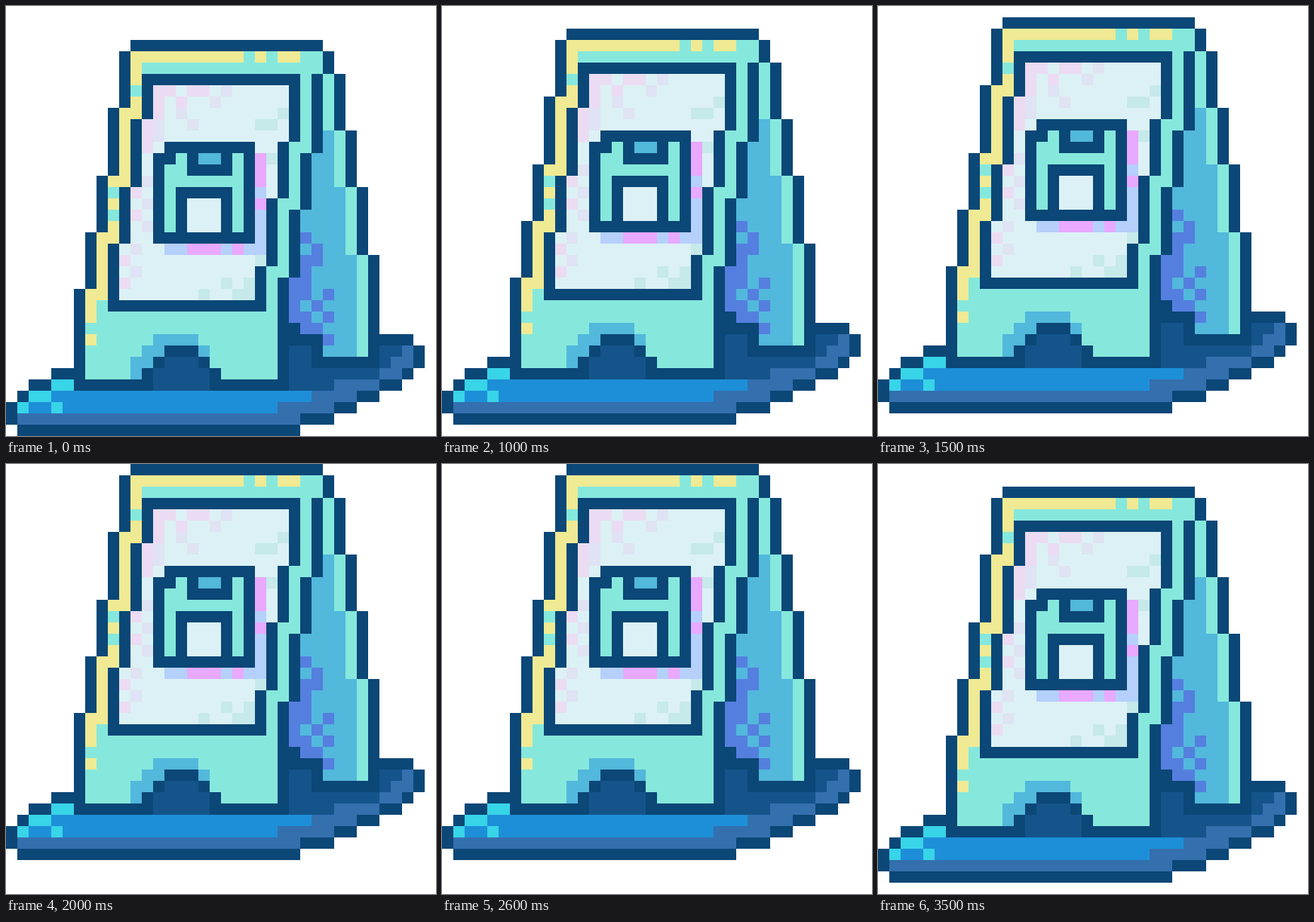
Recreate the animation shown at these times as an HTML page. Size 570x570 px, loop 4 s.

```html
<!DOCTYPE html>
<html lang="en">
<head>
<meta charset="utf-8">
<title>Floating pixel stand</title>
<style>
  html, body { margin: 0; width: 100%; height: 100%; overflow: hidden; background: #fff; }
  svg { display: block; width: 570px; height: 570px; overflow: visible; }
  .runs { fill: none; stroke-width: 1; }
</style>
</head>
<body>
<svg id="stand" viewBox="0 0 38 38" shape-rendering="crispEdges"></svg>
<script>
const CELL = 15;
const color = {
  ink: '#0b4777', mint: '#86e8dc', yellow: '#efea93', sky: '#52b8dc', violet: '#557fdf',
  screen: '#dcf1f5', rose: '#ebdcf3', haze: '#dfe3f3', teal: '#c6e9ea',
  pink: '#e8a9ff', lilac: '#b5d0fb',
  navy: '#14548a', steel: '#346fae', azure: '#1d8fd8', cyan: '#38d4e8'
};
const stand = document.getElementById('stand');

function draw(name, d, attributes) {
  const path = document.createElementNS('http://www.w3.org/2000/svg', 'path');
  path.setAttribute('d', d);
  for (const [key, value] of Object.entries(attributes)) path.setAttribute(key, value);
  stand.append(path);
}
const shape = (name, d) => draw(name, d, { fill: color[name] });
// Horizontal one-cell strokes, placed by the top-left cell of each run.
const runs = (name, d) =>
  draw(name, d, { class: 'runs', stroke: color[name], transform: 'translate(0 .5)' });

// Outline and front
shape('ink', 'M11 3H28V4H29V6H30V11H31V16H32V22H33V29H36V30H37V32H36V33H35V34H33V35H31V36H29V37H26V38H1V37H0V35H1V34H2V33H4V32H6V25H7V20H8V15H9V9H10V4H11z');
shape('mint', 'M11 4H28V6H27V13H26V18H25V24H24V33H7V25H8V20H9V15H10V9H11z');
shape('yellow', 'M11 4H21V5H12V7H11z M22 4h1v1h-1z M24 4h2v1h-2z M11 8H12V10H11V16H9V15H10V9H11z M9 17h1v1h-1z M9 19H10V21H9V26H8V28H7V25H8V20H9z M7 29h1v1h-1z');

// Side
shape('sky', 'M28 11H29V16H30V22H31V31H28V29H26V28H25V24H26V18H27V13H28z');
shape('mint', 'M28 6H29V11H30V16H31V22H32V31H31V22H30V16H29V11H28z');
runs('violet', 'M26 20h1 M27 21h1 M26 22h2 M26 23h1 M25 24h2 M25 25h2 M28 25h1 M25 26h1 M27 26h1 M25 27h2 M28 27h1 M26 28h2 M28 29h1');

// Panel
shape('ink', 'M12 6H26V12H25V17H24V23H23V27H9V21H10V16H11V10H12z');
shape('screen', 'M13 7H25V12H24V17H23V23H22V26H10V21H11V16H12V10H13z');
runs('rose', 'M13 7h2 M16 7h2 M13 8h1 M15 8h1 M13 9h1 M12 10h1 M12 11h1 M12 12h1 M11 16h1 M11 18h1 M10 22h1 M10 24h1');
runs('haze', 'M19 7h1 M18 8h1 M15 9h1 M13 10h1 M16 10h1 M13 11h1 M12 15h1 M12 17h1 M12 19h1 M11 21h1 M11 23h1');
runs('teal', 'M24 9h1 M22 10h2 M23 13h1 M22 22h1 M19 24h1 M21 24h1 M17 25h1 M20 25h2');

// Disk icon and its shadow
shape('lilac', 'M22 13h1v9h-9v-1h8z');
shape('pink', 'M22 13h1v3h-1z M22 17h1v1h-1z M16 21h3v1h-3z M20 21h1v1h-1z');
shape('ink', 'M14 12H22V21H13V13H14z');
shape('mint', 'M15 13H16V15H20V13H21V20H20V16H15V20H14V14H15z');
shape('sky', 'M17 13h2v1h-2z');
shape('screen', 'M16 17h3v3h-3z');

// Arch
shape('sky', 'M13 29H17V30H18V31H14V32H12V33H11V31H12V30H13z');
shape('ink', 'M14 30H17V31H18V32H19V33H12V32H13V31H14z');
shape('navy', 'M14 31H17V32H18V34H13V32H14z');

// Base
shape('navy', 'M25 30H27V32H33V30H35V31H34V32H33V33H29V34H25z');
shape('steel', 'M35 30H36V32H35V33H33V34H31V35H29V36H26V37H1V36H24V35H27V34H29V33H33V32H34V31H35z');
shape('azure', 'M4 34H27V35H24V36H2V35H4z');
runs('cyan', 'M4 33h2 M2 34h2 M1 35h1 M4 35h1');

// Lift in whole cells at each share of the loop.
const lifts = [[0, 0], [.25, 1], [.375, 2], [.5, 3], [.75, 2], [.875, 1], [1, 0]];
stand.animate(
  lifts.map(([offset, cells]) => ({
    offset, transform: `translateY(${-cells * CELL}px)`, easing: 'steps(1, end)'
  })),
  { duration: 4000, iterations: Infinity }
);
</script>
</body>
</html>
```
